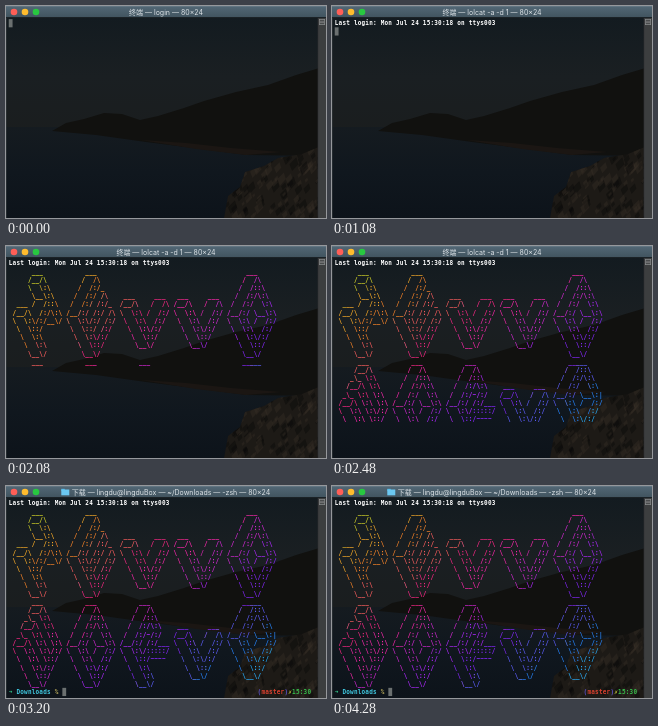
Recreate the animation shown at these times as an HTML page with a canvas. Size 320 px wide and 212 px high, loop 4.76 s.

```html
<!DOCTYPE html>
<html lang="zh">
<head>
<meta charset="utf-8">
<style>
html, body { margin: 0; height: 100%; overflow: hidden; background: #14181b; }
canvas { display: block; width: 320px; height: 212px; }
</style>
</head>
<body>
<canvas id="stage"></canvas>
<script>
const LOOP = 4760, WIDTH = 320, HEIGHT = 212;
const PT = WIDTH / 585;            // window points to stage pixels
const CELL_W = 7, CELL_H = 15, LEFT = 5, TOP = 24;
const MONO = '"DejaVu Sans Mono", "Noto Sans Mono", monospace';
const SANS = 'Inter, "Noto Sans CJK SC", "Noto Sans CJK", sans-serif';

const GLYPHS = {
H: String.raw`
      ___
     /__/\
     \  \:\
      \__\:\
  ___ /  /::\
 /__/\  /:/\:\
 \  \:\/:/__\/
  \  \::/
   \  \:\
    \  \:\
     \__\/
`,
E: String.raw`
      ___
     /  /\
    /  /:/_
   /  /:/ /\
  /  /:/ /:/_
 /__/:/ /:/ /\
 \  \:\/:/ /:/
  \  \::/ /:/
   \  \:\/:/
    \  \::/
     \__\/
`,
L: String.raw`



  ___     ___
 /__/\   /  /\
 \  \:\ /  /:/
  \  \:\  /:/
   \  \:\/:/
    \  \::/
     \__\/

`,
O: String.raw`
      ___
     /  /\
    /  /::\
   /  /:/\:\
  /  /:/  \:\
 /__/:/ \__\:\
 \  \:\ /  /:/
  \  \:\  /:/
   \  \:\/:/
    \  \::/
     \__\/
`,
W: String.raw`
      ___
     /__/\
    _\_ \:\
   /__/\ \:\
  _\_ \:\ \:\
 /__/\ \:\ \:\
 \  \:\ \:\/:/
  \  \:\ \::/
   \  \:\/:/
    \  \::/
     \__\/
`,
R: String.raw`
      ___
     /  /\
    /  /::\
   /  /:/\:\
  /  /:/~/:/
 /__/:/ /:/___
 \  \:\/:::::/
  \  \::/~~~~
   \  \:\
    \  \:\
     \__\/
`,
D: String.raw`
     _____
    /  /::\
   /  /:/\:\
  /  /:/  \:\
 /__/:/ \__\:|
 \  \:\ /  /:/
  \  \:\  /:/
   \  \:\/:/
    \  \::/
     \__\/

`};

function banner(word) {
  const letters = [...word].map(c => GLYPHS[c].split('\n').slice(1, 12));
  return letters[0].map((_, row) => letters.map(l => l[row].padEnd(14)).join(''));
}
const ART = [...banner('HELLO'), ...banner('WORLD')];

const TITLES = [
  [0, '终端 — login — 80×24'],
  [560, '终端 — -zsh — 80×24'],
  [800, '终端 — lolcat -a -d 1 — 80×24'],
  [960, '终端 — -zsh — 80×24'],
  [1080, '终端 — lolcat -a -d 1 — 80×24'],
  [2720, '下载 — lingdu@lingduBox — ~/Downloads — -zsh — 80×24']
];
const LOGIN_AT = 480, ART_AT = 1440, ROW_MS = 56, PROMPT_AT = 2720;

const canvas = document.getElementById('stage');
const ctx = canvas.getContext('2d');
const ratio = window.devicePixelRatio || 1;
canvas.width = WIDTH * ratio;
canvas.height = HEIGHT * ratio;

function gradient(y0, y1, ...colors) {
  const g = ctx.createLinearGradient(0, y0, 0, y1);
  colors.forEach((c, i) => g.addColorStop(i / (colors.length - 1), c));
  return g;
}

function rect(x, y, w, h, fill) {
  ctx.fillStyle = fill;
  ctx.fillRect(x, y, w, h);
}

function shape(fill, ...points) {
  ctx.fillStyle = fill;
  ctx.beginPath();
  points.forEach(([x, y]) => ctx.lineTo(x, y));
  ctx.fill();
}

function seeded(seed) {
  return () => (seed = (seed * 16807) % 2147483647) / 2147483647;
}

function drawRocks() {
  ctx.save();
  shape('#1d1a16', [218, 212], [222, 190], [234, 181], [239, 166], [258, 160],
    [272, 152], [296, 148], [320, 138], [320, 212]);
  ctx.clip();
  const random = seeded(41);
  for (let i = 0; i < 160; i++) {
    const x = 218 + 102 * random(), y = 140 + 72 * random(), size = 2 + 5 * random();
    shape(i % 2 ? 'rgba(58,50,40,.35)' : 'rgba(8,8,8,.4)',
      [x, y], [x + size, y - size], [x + size * 1.3, y], [x + size * 0.4, y + size]);
  }
  ctx.restore();
}

function drawLandscape() {
  rect(0, 11, WIDTH, 201, gradient(11, 130, '#131b20', '#1a1f22', '#1a1d1e'));
  rect(0, 121, WIDTH, 91, gradient(121, 212, '#151b20', '#10171e', '#0d131a'));
  shape('#11110f', [46, 125], [60, 117], [78, 113], [98, 107], [116, 108], [134, 114],
    [152, 110], [178, 102], [198, 95], [230, 86], [262, 79], [290, 69], [320, 60],
    [320, 150], [240, 149], [195, 143], [140, 136], [90, 129]);
  shape('#1b1613', [135, 134], [180, 137], [225, 142], [275, 146], [240, 149], [190, 143]);
  drawRocks();
}

function drawWindow(title, withFolder) {
  rect(0, 0, WIDTH, 11.5, gradient(0, 11.5, '#526775', '#41545f'));
  rect(0, 0, WIDTH, 0.6, '#6b7e8a');
  rect(0, 11, WIDTH, 0.7, '#15191c');
  ['#ff5f57', '#febc2e', '#28c840'].forEach((color, i) => {
    ctx.fillStyle = color;
    ctx.beginPath();
    ctx.arc(8 + 11 * i, 6, 3.3, 0, 2 * Math.PI);
    ctx.fill();
  });
  rect(312, 12, 8, 200, '#3c3e3f');
  rect(311.6, 12, 0.6, 200, '#2a2c2d');
  rect(313, 13, 6, 6, '#8a8c8d');
  rect(313.7, 13.7, 4.6, 4.6, '#4a4c4d');
  rect(314, 15.7, 4, 0.7, '#a2a4a5');
  rect(0, 12, 0.6, 200, '#33393d');

  ctx.font = `${12.8 * PT}px ${SANS}`;
  ctx.textAlign = 'center';
  ctx.fillStyle = '#dde3e7';
  ctx.fillText(title, withFolder ? 165 : 160, 8.7);
  if (withFolder) {
    const x = 165 - ctx.measureText(title).width / 2 - 10.5;
    rect(x, 2.8, 3.5, 2, '#4fb5e4');
    rect(x, 3.5, 8, 5.8, '#6bc8f1');
  }
}

function put(text, col, row, color) {
  ctx.textAlign = 'left';
  [...text].forEach((c, i) => {
    if (c === ' ') return;
    ctx.fillStyle = typeof color === 'function' ? color(col + i) : color;
    ctx.fillText(c, LEFT + (col + i) * CELL_W, TOP + row * CELL_H + 11.5);
  });
}

function cursor(col, row) {
  rect(LEFT + col * CELL_W, TOP + row * CELL_H, CELL_W, CELL_H, '#6b7070');
}

// Sine rainbow snapped to the terminal's 6x6x6 colour cube.
function rainbow(row, col) {
  const phase = 0.27 + 0.1 * (row - 1 + col / 3);
  const channel = k => {
    const value = Math.sin(phase + k * 2 * Math.PI / 3) * 127 + 128;
    const level = Math.floor(6 * value / 256);
    return level ? 55 + 40 * level : 40;
  };
  return `rgb(${channel(0)},${channel(1)},${channel(2)})`;
}

function drawTerminal(t) {
  ctx.save();
  ctx.scale(PT, PT);
  ctx.font = `bold 11px ${MONO}`;
  if (t < LOGIN_AT) cursor(0, 0);
  else put('Last login: Mon Jul 24 15:30:18 on ttys003', 0, 0, '#fff');
  if (t >= LOGIN_AT && t < ART_AT) cursor(0, 1);

  const shown = Math.floor((t - ART_AT) / ROW_MS) + 1;
  ART.slice(0, Math.max(0, shown)).forEach((line, i) =>
    put(line, 0, i + 1, col => rainbow(i + 1, col)));

  if (t >= PROMPT_AT) {
    put('➜', 0, 23, '#35c98b');
    put('Downloads', 2, 23, '#3fc5dc');
    put('%', 12, 23, '#c8b860');
    cursor(14, 23);
    put('(', 65, 23, '#5a4fc4');
    put('master', 66, 23, '#d9412f');
    put(')', 72, 23, '#5a4fc4');
    put('✗', 73, 23, '#c9c93c');
    put('15:30', 74, 23, '#37b84a');
  }
  ctx.restore();
}

function draw(now) {
  const t = now % LOOP;
  ctx.setTransform(ratio, 0, 0, ratio, 0, 0);
  drawLandscape();
  drawWindow(TITLES.filter(([at]) => at <= t).pop()[1], t >= PROMPT_AT);
  drawTerminal(t);
}

const start = performance.now();
function tick() {
  draw(performance.now() - start);
  requestAnimationFrame(tick);
}
tick();
</script>
</body>
</html>
```
